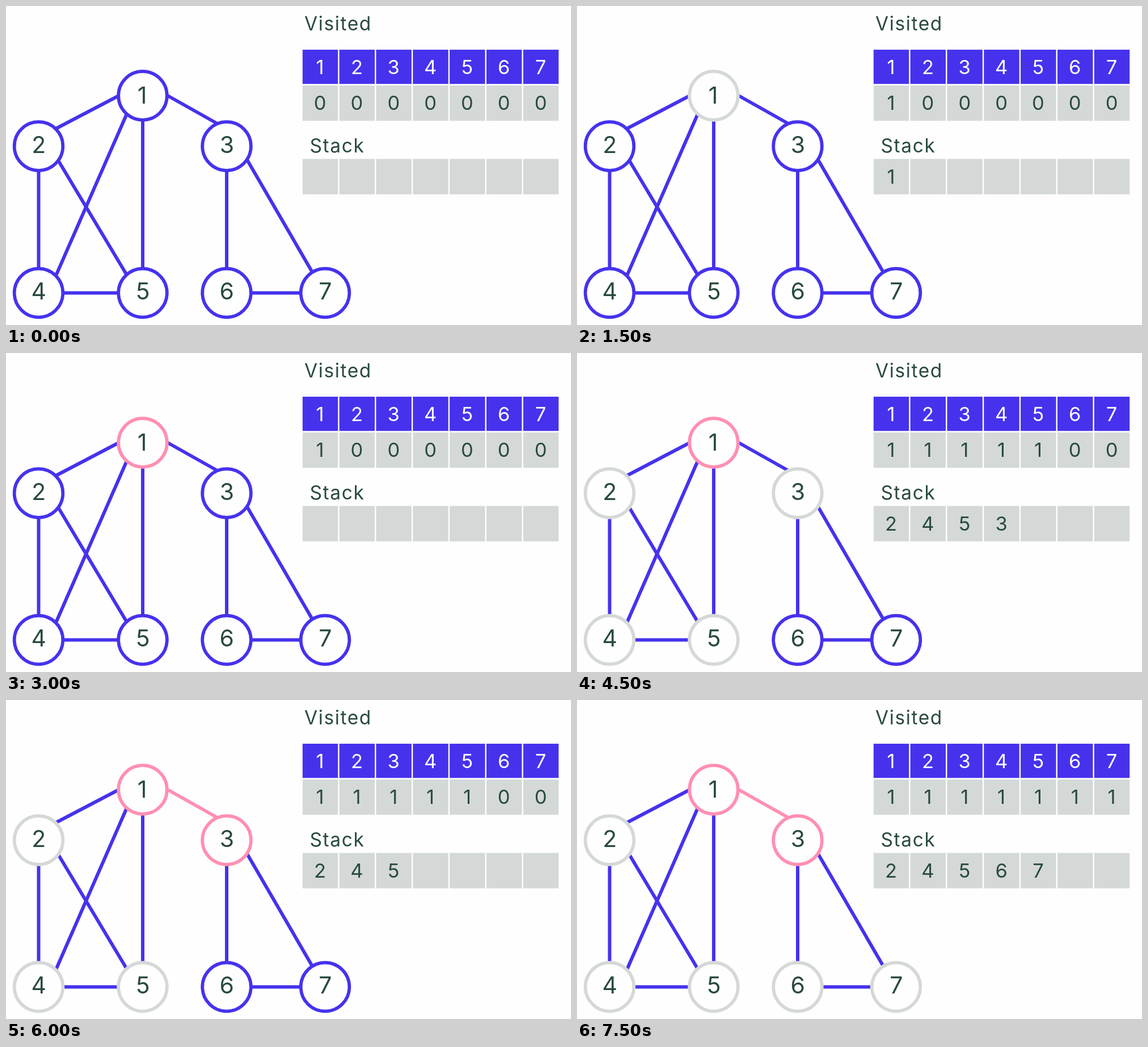
Recreate the animation shown at these times as an HTML page. Size 996 px wide and 562 px high, loop 8 s.

```html
<!DOCTYPE html>
<html lang="en">
<head>
<meta charset="utf-8">
<title>Depth-first search</title>
<style>
  html, body { margin: 0; width: 100%; height: 100%; overflow: hidden; background: #fefefe; }
  svg { display: block; width: 996px; height: 562px; }
  text { font-family: Inter, "Open Sans", sans-serif; fill: #294a3e; }
  .title { font-size: 33.5px; letter-spacing: 1.6px; }
  .digit { font-size: 34.5px; text-anchor: middle; }
  .node { font-size: 41px; }
  .head { fill: #fff; }
</style>
</head>
<body>
<svg id="stage" viewBox="0 0 996 562"></svg>
<script>
const BLUE = '#4632ed', GREY = '#d4d9d7', PINK = '#ff8fb1';
const LOOP = 8000, STEP = 1500;
const stage = document.getElementById('stage');

// Ring centres of nodes 1 to 7
const nodes = [[241, 158], [57.5, 247], [389, 247], [57.5, 505.5],
               [241, 505.5], [389, 505.5], [562.5, 505.5]];
// The ends sit under the rings
const edges = {
  '1-2': [197, 159, 88, 216],
  '1-3': [285, 158, 374, 208],
  '1-4': [213, 190, 88, 475],
  '1-5': [241, 200, 241, 463],
  '2-4': [57.5, 289, 57.5, 463],
  '2-5': [92, 272, 213, 474],
  '3-6': [389, 289, 389, 463],
  '3-7': [425, 271, 540, 469],
  '4-5': [100, 505.5, 198, 505.5],
  '6-7': [431, 505.5, 520, 505.5]
};
// Nodes put on the stack, nodes finished, edges walked
const steps = [
  { stack: '',      done: '',   path: '' },
  { stack: '1',     done: '',   path: '' },
  { stack: '',      done: '1',  path: '' },
  { stack: '2453',  done: '1',  path: '' },
  { stack: '245',   done: '13', path: '1-3' },
  { stack: '24567', done: '13', path: '1-3' }
];

function add(tag, attrs, text = '') {
  const el = document.createElementNS('http://www.w3.org/2000/svg', tag);
  for (const name in attrs) el.setAttribute(name, attrs[name]);
  el.textContent = text;
  return stage.appendChild(el);
}

function row(y, height, baseline, fill, cls, label) {
  return nodes.map((_, i) => {
    const x = 522.8 + i * 64.83;
    add('rect', { x, y, width: 62.4, height, fill });
    return add('text', { x: x + 30.8, y: baseline, class: 'digit ' + cls }, label(i));
  });
}

const lines = Object.entries(edges).map(([id, [x1, y1, x2, y2]]) =>
  ({ id, el: add('line', { x1, y1, x2, y2, 'stroke-width': 6 }) }));

const rings = nodes.map(([cx, cy], i) => {
  const ring = add('circle', { cx, cy, r: 42.8, fill: '#fefefe', 'stroke-width': 5.8 });
  add('text', { x: i ? cx + 0.3 : cx - 1, y: cy + (i > 2 ? 11.7 : i ? 12 : 14), class: 'digit node' }, i + 1);
  return ring;
});

add('text', { x: 526, y: 42.5, class: 'title' }, 'Visited');
add('text', { x: 535.5, y: 257.5, class: 'title' }, 'Stack');
row(77, 60.3, 119.5, BLUE, 'head', i => i + 1);
const visitedCells = row(140, 62.3, 183, GREY, '', () => '0');
const stackCells = row(269.5, 62.3, 312.5, GREY, '', () => '');

function show({ stack, done, path }) {
  lines.forEach(({ id, el }) => el.setAttribute('stroke', id === path ? PINK : BLUE));
  rings.forEach((ring, i) => {
    const name = String(i + 1);
    const finished = done.includes(name), waiting = stack.includes(name);
    ring.setAttribute('stroke', finished ? PINK : waiting ? GREY : BLUE);
    visitedCells[i].textContent = finished || waiting ? '1' : '0';
    stackCells[i].textContent = stack[i] || '';
  });
}

let current = -1;
function tick() {
  const index = Math.floor(performance.now() % LOOP / STEP);
  if (index !== current) show(steps[current = index]);
  requestAnimationFrame(tick);
}
tick();
</script>
</body>
</html>
```
